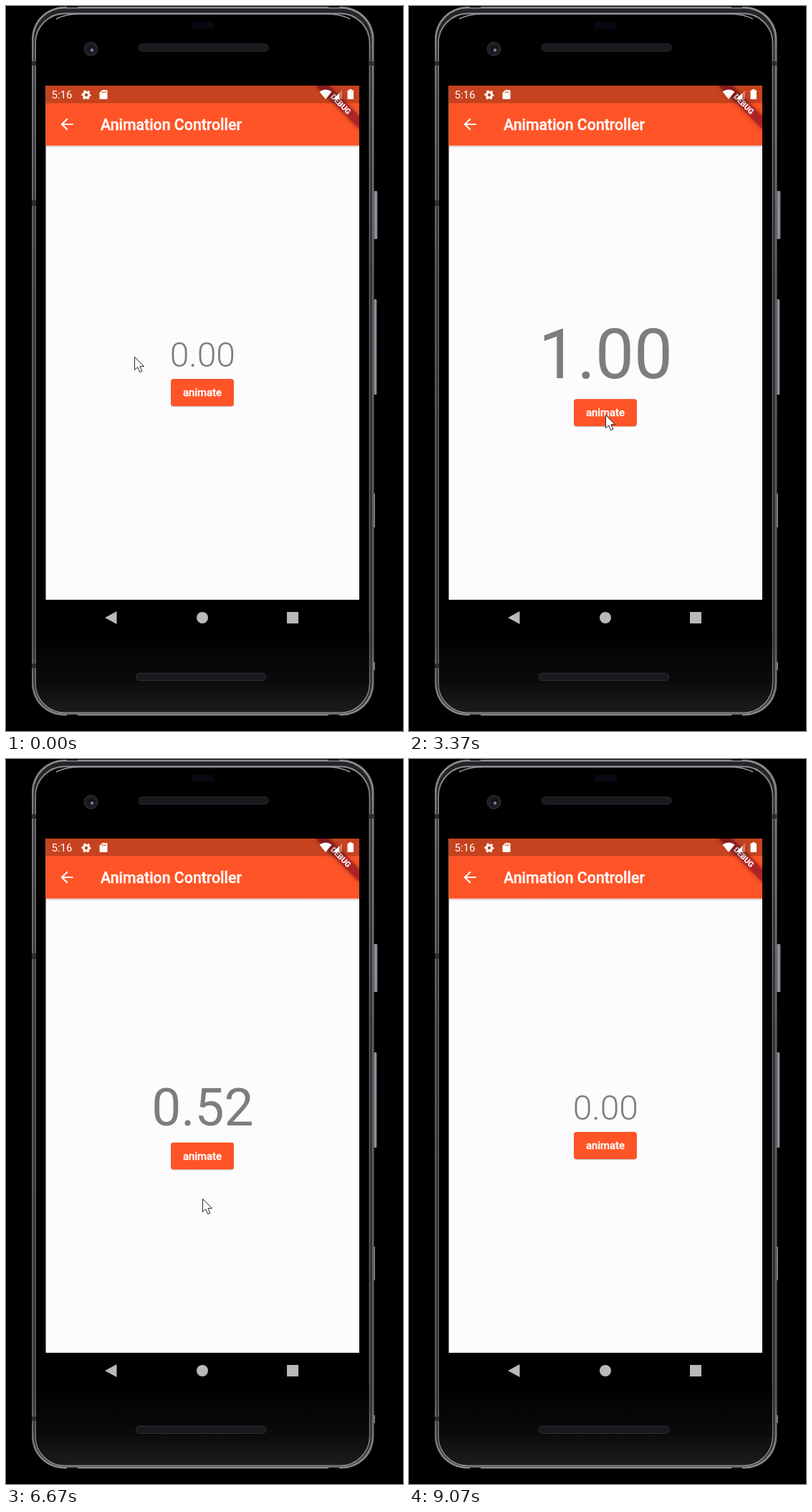
Write an HTML page that moves like this. It is 554 px wide and 1011 px high and loops after 9850 ms.

```html
<!DOCTYPE html>
<html lang="en">
<head>
<meta charset="utf-8">
<title>Animation Controller</title>
<style>
  html, body { margin: 0; width: 100%; height: 100%; overflow: hidden; background: #000; }
  svg { display: block; width: 554px; height: 1011px; font-family: Roboto, "Noto Sans", sans-serif; }
</style>
</head>
<body>
<svg viewBox="0 0 554 1011">
  <defs>
    <linearGradient id="rim" x2="0" y2="1">
      <stop offset="0" stop-color="#8d8e92"/>
      <stop offset=".08" stop-color="#77787d"/>
      <stop offset=".4" stop-color="#5c5d62"/>
      <stop offset=".9" stop-color="#5a5b5f"/>
      <stop offset="1" stop-color="#88898d"/>
    </linearGradient>
    <linearGradient id="chin" x2="0" y2="1">
      <stop offset="0" stop-color="#000"/>
      <stop offset=".6" stop-color="#0b0b0b"/>
      <stop offset="1" stop-color="#1c1c1a"/>
    </linearGradient>
    <linearGradient id="shade" x2="0" y2="1">
      <stop offset="0" stop-color="#a0604c" stop-opacity=".4"/>
      <stop offset="1" stop-color="#a0604c" stop-opacity="0"/>
    </linearGradient>
    <linearGradient id="key">
      <stop offset="0" stop-color="#4a4b50"/>
      <stop offset=".6" stop-color="#9a9ba3"/>
      <stop offset="1" stop-color="#66676d"/>
    </linearGradient>
    <clipPath id="screen"><rect x="55.500" y="111" width="437.500" height="717"/></clipPath>
    <clipPath id="face"><rect x="230" width="88" height="38" rx="4"/></clipPath>
    <filter id="blur" x="-20%" y="-80%" width="140%" height="260%"><feGaussianBlur stdDeviation="3"/></filter>
  </defs>

  <!-- phone body -->
  <g fill="url(#key)">
    <rect x="512" y="258" width="6.500" height="67" rx="1.500"/>
    <rect x="512" y="409" width="5.500" height="133" rx="1.500"/>
    <rect x="512" y="680" width="3" height="47"/>
    <rect x="511" y="915" width="4" height="11"/>
  </g>
  <rect x="36" y="1" width="477.500" height="988.500" rx="45" fill="url(#rim)"/>
  <rect x="38.500" y="3.500" width="472" height="983.500" rx="43" fill="#242427"/>
  <rect x="41" y="10.500" width="466.500" height="975" rx="41" fill="#000" stroke="url(#rim)" stroke-width="1.800"/>
  <path d="M42 875H506.500V944a40 40 0 0 1-40 40H82a40 40 0 0 1-40-40z" fill="url(#chin)"/>
  <path d="M70 18Q84 11 102 11H448Q466 11 480 18" fill="none" stroke="#9c9da2" stroke-width="1.500"/>
  <path d="M36 271h6v8h-6zM36 77h6v6h-6zM507 77h6v6h-6zM36 917h6v6h-6z" fill="#2c2c2f"/>
  <path d="M85 1h15M450 1h15M85 989h15M450 989h15" stroke="#000" stroke-width="2"/>
  <rect x="259" y="22" width="31" height="10" rx="3" fill="#080812"/>
  <circle cx="118.500" cy="60" r="9.500" fill="#1d1e22" stroke="#34353a"/>
  <circle cx="119" cy="60" r="5" fill="#11131f"/>
  <circle cx="120" cy="61.500" r="2.200" fill="#77829c"/>
  <g fill="#18181f" stroke="#303035">
    <rect x="185" y="53" width="181" height="10" rx="4.500"/>
    <rect x="181.500" y="930.500" width="181" height="10" rx="4.500"/>
  </g>

  <!-- app -->
  <g clip-path="url(#screen)">
    <rect x="55" y="111" width="439" height="717" fill="#fcfcfe"/>
    <rect x="55" y="194" width="439" height="4" fill="url(#shade)"/>
    <rect x="55" y="111" width="439" height="83.500" fill="#ff5427"/>
    <g transform="translate(493 111) rotate(45)">
      <rect x="-43" y="30" width="86" height="12.800" opacity=".4" filter="url(#blur)"/>
      <rect x="-43" y="30" width="86" height="12.800" fill="#b01c2c" fill-opacity=".72"/>
      <text y="40.300" text-anchor="middle" font-size="10.900" font-weight="900" fill="#fff">DEBUG</text>
    </g>
    <rect x="55" y="111" width="439" height="24.500" opacity=".22"/>
  </g>
  <g fill="#fff">
    <text x="63.500" y="129.300" font-size="15">5:16</text>
    <circle cx="112" cy="124" r="3.700" fill="none" stroke="#fff" stroke-width="3"/>
    <circle cx="112" cy="124" r="5.700" fill="none" stroke="#fff" stroke-width="2" stroke-dasharray="3 2.970" stroke-dashoffset="1.500"/>
    <path d="M134.500 117h5.500q1.500 0 1.500 1.500v10q0 1.500-1.500 1.500h-8q-1.500 0-1.500-1.500V121z"/>
    <path d="M134.500 119v2.500m2.200-2.500v2.500m2.200-2.500v2.500" stroke="#c9451b"/>
    <path d="M437.500 119.500q8.500-6 17 0L446 130z"/>
    <path d="M456.500 130L469 117.500V130z" fill-opacity=".35"/>
    <path d="M456.500 130L465 121.500V130z"/>
    <path d="M479 116h3.500v1.500h2.500V130h-8.500v-12.500h2.500z"/>
    <path transform="translate(72.200 152.200) scale(1.066)" d="M20 11H7.830l5.590-5.590L12 4l-8 8 8 8 1.410-1.410L7.830 13H20z"/>
    <text x="132" y="173.300" font-size="21.300" font-weight="500" stroke="#fff" stroke-width=".35">Animation Controller</text>
  </g>
  <g fill="#b9b9b9">
    <path d="M138 853L154.500 844V862z"/>
    <circle cx="274" cy="853" r="8"/>
    <rect x="392" y="845" width="16" height="16"/>
  </g>

  <text id="num" x="274.300" text-anchor="middle" fill="#7d7d7d"></text>
  <g id="btn">
    <rect x="230" y="1" width="88" height="38" rx="4" opacity=".2"/>
    <g clip-path="url(#face)">
      <rect x="230" width="88" height="38" fill="#ff5427"/>
      <rect id="glow" x="230" width="88" height="38" fill="#fff"/>
      <circle id="ripple" cx="275" cy="19" fill="#fff"/>
    </g>
    <text x="274" y="24.300" text-anchor="middle" font-size="14.900" font-weight="500" fill="#fff" stroke="#fff" stroke-width=".35">animate</text>
  </g>
  <path id="cursor" d="M.5.500V18.500L4.700 14.800 7.700 21.500 10.800 20.200 7.900 13.600H13.500z" fill="#fff" stroke="#26262c"/>
</svg>
<script>
const LOOP = 9850, RUN = 1000;
const FONT = 48, LINE = 1.172, ASCENT = .928, MIDDLE = 511, BOX = 51.2, INSET = 6.4;

// starts of the runs; odd ones go backwards
const starts = [2170, 4420, 6150, 7870];

// pointer tip: time, x, y
const path = [
  [0, 179, 489], [1970, 274, 541], [2990, 274, 541], [3370, 274, 570], [3500, 274, 577],
  [3720, 274, 577], [3730, 273, 577], [3860, 273, 577], [4030, 277, 573], [5930, 277, 573],
  [6110, 276, 542], [6220, 276, 542], [6640, 274, 613], [6930, 274, 613], [7440, 282, 570],
  [7930, 282, 570], [8200, 283, 502], [8810, 296, 56], [8950, 300, -30]
];

const $ = id => document.getElementById(id);
const set = (id, attrs) => {
  for (const k in attrs) $(id).setAttribute(k, attrs[k]);
};
const clamp = x => Math.min(1, Math.max(0, x));
const ease = x => x * x * (3 - 2 * x);

function valueAt(t) {
  return starts.reduce((v, s, i) => v + (i % 2 ? -1 : 1) * clamp((t - s) / RUN), 0);
}

function pointerAt(t) {
  const i = path.findIndex(p => p[0] > t);
  if (i < 0) return path[path.length - 1].slice(1);
  const [a, b] = [path[i - 1], path[i]];
  const k = ease((t - a[0]) / (b[0] - a[0]));
  return [a[1] + (b[1] - a[1]) * k, a[2] + (b[2] - a[2]) * k];
}

function draw(t) {
  const v = valueAt(t), size = FONT * (1 + v);
  const half = (size * LINE + BOX) / 2;
  $('num').textContent = Math.abs(v).toFixed(2);
  set('num', {
    'font-size': size,
    'font-weight': v < .5 ? 300 : 400,
    y: MIDDLE - half + size * ASCENT + 1
  });
  set('btn', { transform: `translate(0 ${MIDDLE + half - BOX + INSET})` });

  // time since the latest press
  const press = starts.map(s => t - s + 80).filter(d => d >= 0).pop() ?? LOOP;
  const fade = 1 - clamp((press - 280) / 220);
  set('glow', { opacity: .12 * clamp(press / 100) * fade });
  set('ripple', { r: 8 + 50 * clamp(press / 260), opacity: .16 * fade });

  set('cursor', { transform: `translate(${pointerAt(t).join(' ')})` });
}

function tick() {
  draw(performance.now() % LOOP);
  requestAnimationFrame(tick);
}
tick();
</script>
</body>
</html>
```
